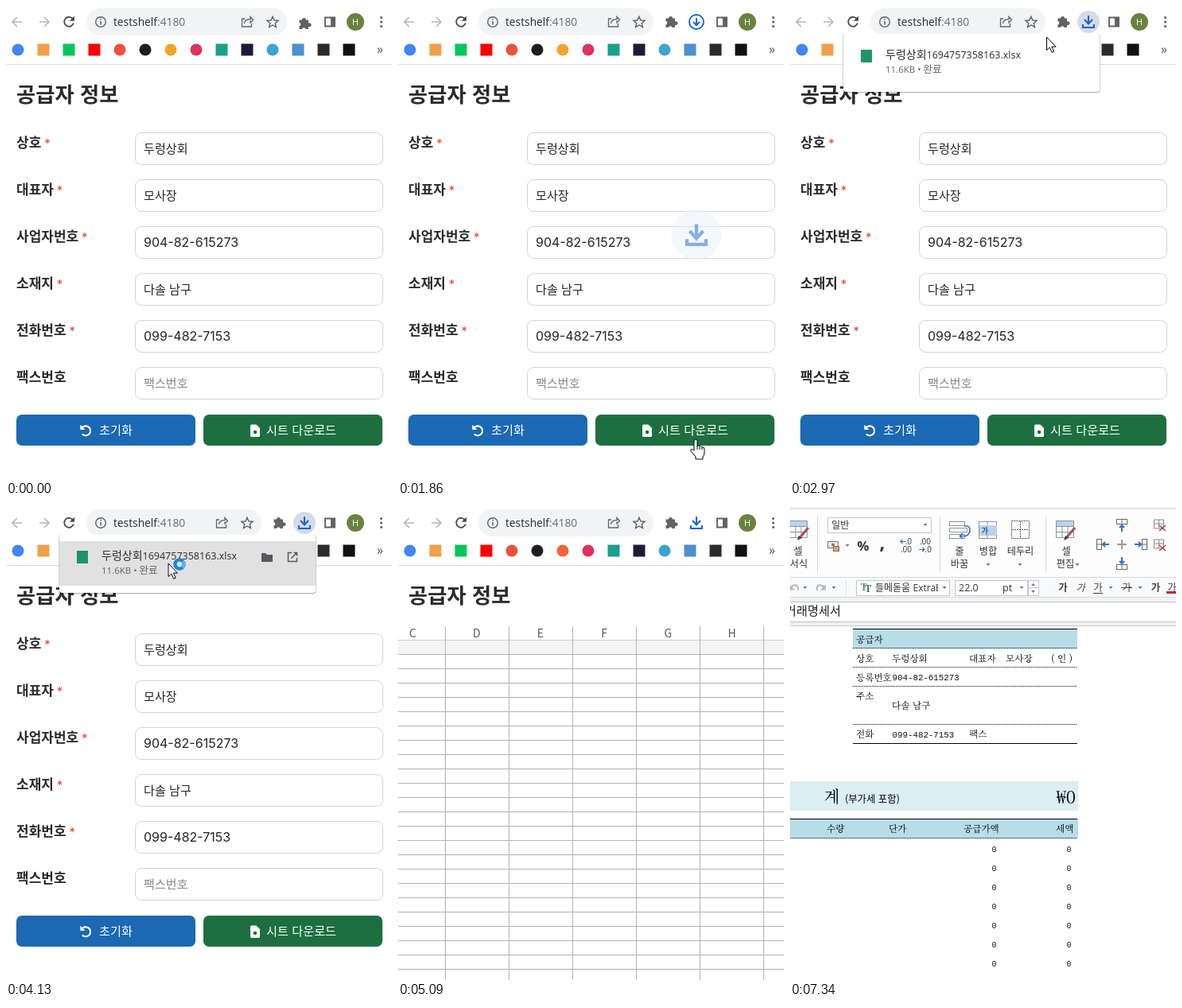
These frames come from a looping animation (485x595 px, 8370 ms). An HTML page:

```html
<!DOCTYPE html>
<html lang="ko">
<head>
<meta charset="utf-8">
<style>
html, body { margin: 0; width: 100%; height: 100%; overflow: hidden; background: #fff; }
svg { display: block; }
text { white-space: pre; }
.ko { font-family: "Noto Sans CJK KR", "Noto Sans CJK", sans-serif; }
.form { font-family: Inter, "Noto Sans CJK KR", sans-serif; }
.ui { font-family: "Open Sans", "Noto Sans CJK KR", sans-serif; }
.cell { font-family: "Noto Serif CJK KR", "Noto Sans CJK KR", serif; }
.num { font-family: "Liberation Mono", monospace; }
</style>
</head>
<body>
<svg id="stage" width="485" height="595" viewBox="0 0 485 595"></svg>
<script>
const LOOP = 8370;
const shop = '두렁상회', owner = '모사장', regNo = '904-82-615273', place = '다솔 남구', phone = '099-482-7153';

// Markup helpers
const text = (x, y, s, size, cls = 'ko', fill = '#222', extra = '') =>
  `<text x="${x}" y="${y}" font-size="${size}" class="${cls}" fill="${fill}" ${extra}>${s}</text>`;
const mid = 'text-anchor="middle"', end = 'text-anchor="end"';
const rect = (x, y, w, h, fill, extra = '') =>
  `<rect x="${x}" y="${y}" width="${w}" height="${h}" fill="${fill}" ${extra}/>`;
const path = (d, color, w = 1, extra = '') =>
  `<path d="${d}" fill="none" stroke="${color}" stroke-width="${w}" ${extra}/>`;
const solid = (d, fill, extra = '') => `<path d="${d}" fill="${fill}" ${extra}/>`;
const circle = (x, y, r, fill, extra = '') => `<circle cx="${x}" cy="${y}" r="${r}" fill="${fill}" ${extra}/>`;
const group = (id, body, extra = '') => `<g id="${id}" ${extra}>${body}</g>`;
const at = (x, y, body, scale = 1) => `<g transform="translate(${x} ${y}) scale(${scale})">${body}</g>`;
const range = (n, f) => Array.from({ length: n }, (_, i) => f(i)).join('');

const trayIcon = (color, w) => path('M0-8V2M-5-3L0 2.5 5-3M-7 3V7H7V3', color, w);
const ringCursor = circle(0, 0, 5.5, '#d9eefb', 'stroke="#1d86d8" stroke-width="4.5"') +
  path('M0-5.5A5.5 5.5 0 0 1 5.5 0', '#5db4f0', 4.5);

function browserBar() {
  const gray = '#5f6368';
  const arrow = 'M13 0H1M7-6L1 0 7 6';
  const marks = [
    [15, 'c', '#4285f4'], [47, 's', '#f0a04a'], [79, 's', '#03c75a'], [111, 's', '#ff0000'],
    [143, 'c', '#f0503c'], [175, 'c', '#1b1f23'], [207, 'c', '#f0a52a', 'id="tint"'], [239, 'c', '#e0315f'],
    [271, 's', '#1ba08c'], [303, 's', '#1c1c3a'], [335, 'c', '#3aa5d0'], [367, 's', '#4b90cf'],
    [399, 's', '#2b2b2b'], [431, 's', '#111111']
  ].map(([x, kind, color, extra]) => kind === 'c'
    ? circle(x, 55, 7.5, color, extra)
    : rect(x - 7.5, 47.5, 15, 15, color)).join('');
  return rect(0, 0, 485, 74, '#fff') +
    at(7, 20, path(arrow, '#b5b8bc', 1.7)) +
    at(55, 20, `<g transform="scale(-1 1)">${path(arrow, '#b5b8bc', 1.7)}</g>`) +
    path('M84.3 16.5A6 6 0 1 0 85 21.5', '#4a4d51', 1.8) + solid('M86 12.5V18.7H79.8Z', '#4a4d51') +
    rect(101, 3, 252, 34, '#f1f3f4', 'rx="17" id="pill"') +
    circle(119, 20, 6.3, 'none', `stroke="${gray}" stroke-width="1.4"`) +
    path('M119 19V23.5M119 16V17.6', gray, 1.5) +
    text(135, 25, 'testshelf<tspan fill="#6a6d71">:4180</tspan>', 13.8, 'ui', '#2a2b2e') +
    group('pillIcons',
      path('M300 16H296.5V26H308.5V22M299.5 22C300 18 303 16.5 307 16.5V13.5L310.5 17.5 307 21V18.5', gray, 1.3) +
      path('M335 13.3L337 18 342 18.4 338.2 21.7 339.4 26.6 335 24 330.6 26.6 331.8 21.7 328 18.4 333 18Z', gray, 1.4)) +
    group('puzzle', solid('M-6.5-4.5H-3A2.5 2.5 0 1 1 2-4.5H5V-.5A2.5 2.5 0 1 1 5 4V7H1.5A2.3 2.3 0 0 0-3 7H-6.5V3.5A2.3 2.3 0 0 0-6.5-1Z', gray)) +
    group('dl', circle(0, 0, 14, '#d5dbe6', 'id="dlHover"') +
      group('dlRing', circle(0, 0, 9, '#fff', 'stroke="#1a66c9" stroke-width="1.9"') +
        path('M0-5V4M-4 0L0 4.2 4 0', '#1a66c9', 2)) +
      group('dlTray', trayIcon('#1a66c9', 2.1)), 'transform="translate(375 20)"') +
    path('M401 14.5H413V25.5H401Z', gray, 1.9) + rect(408, 14, 5, 12, gray) +
    circle(439, 20, 11, '#68823f') + text(439, 24, 'H', 11, 'ui', '#fff', mid) +
    range(3, i => circle(471.5, 14.5 + i * 5.5, 1.6, gray)) +
    marks + text(466, 60, '»', 16, 'ui', '#4a4d51') +
    path('M0 73.5H485', '#dadce0');
}

function formPage() {
  const rows = [
    ['상호', 1, shop, 15.1, 'ko'], ['대표자', 1, owner, 15.1, 'ko'], ['사업자번호', 1, regNo, 16, 'form'],
    ['소재지', 1, place, 15.1, 'ko'], ['전화번호', 1, phone, 16, 'form'], ['팩스번호', 0, '팩스번호', 15.1, 'ko']
  ];
  return text(13, 121, '공급자 정보', 26.3, 'ko', '#2b2b2b', 'font-weight="700"') +
    rows.map(([label, need, value, size, cls], i) => {
      const y = 159 + i * 59;
      return text(13, y + 19, label, 17, 'ko', '#2b2b2b', 'font-weight="600"') +
        (need ? text(17 + label.length * 15.6, y + 18.5, '*', 15, 'form', '#f03e2e') : '') +
        rect(162.5, y + .5, 311, 40, '#fff', 'rx="8" stroke="#ced4da"') +
        text(173, y + 26, value, size, cls, need ? '#212529' : '#85898d');
    }).join('') +
    rect(13, 514, 225, 39, '#1b68b3', 'rx="7"') + rect(248, 514, 225, 39, '#1d6f42', 'rx="7"') +
    path('M95.5 530.5A6 6 0 1 1 95.8 538.5', '#fff', 2.1) + solid('M93.3 526.8V533H99.5Z', '#fff') +
    text(117, 539, '초기화', 15.2, 'ko', '#fff', 'font-weight="500"') +
    solid('M307 528Q307 526.5 308.5 526.5H314.5L319 531V540.5Q319 542 317.5 542H308.5Q307 542 307 540.5Z', '#fff') +
    circle(313, 536, 2.3, '#1d6f42') +
    text(327, 539, '시트 다운로드', 15.2, 'ko', '#fff', 'font-weight="500"');
}

function downloadPopup() {
  const gray = '#55585c';
  return rect(67, 36, 322, 74, '#000', 'rx="4" opacity=".1"') + rect(66, 35, 324, 74, '#000', 'rx="4" opacity=".18"') +
    rect(67, 35, 322, 73, '#fff', 'rx="4"') +
    group('rowHover', rect(67, 43, 322, 56, '#e1e1e1') +
      solid('M321 58H326L328 60H335V69H321Z', gray) +
      path('M359 57.5H354.5V68.5H365.5V64M361.5 57.5H365.5V61.5M365.5 57.5L358.5 64.5', gray, 1.5)) +
    rect(89, 55, 14, 16, '#1f9467') +
    text(120, 66, `${shop}<tspan class="ui" font-size="12.5">1694757358163.xlsx</tspan>`, 14, 'ko', '#2a2b2e') +
    text(120, 84, '11.6KB • <tspan font-size="12.5" class="ko">완료</tspan>', 11.5, 'ui', '#5f6368');
}

function emptyGrid() {
  return rect(0, 150, 485, 445, '#fff') + rect(0, 168, 485, 17, '#f4f4f4') +
    range(24, i => path(`M0 ${167.5 + i * 18}H485`, i ? '#b3b3b3' : '#cfcfcf')) +
    range(6, i => path(`M${59.5 + i * 80} 150V595`, '#b3b3b3')) +
    range(6, i => text(18.5 + i * 80.2, 164, 'CDEFGH'[i], 14, 'ko', '#555', mid + ' font-weight="300"'));
}

function ribbon() {
  const ink = '#333', edge = '#c3c7cc';
  const label = (x, y, s) => text(x, y, s, 12.2, 'ko', ink, mid);
  const caret = (x, y) => solid(`M${x - 2.5} ${y - 1}H${x + 2.5}L${x} ${y + 2}Z`, '#777');
  const box = (x, y, w, h) => rect(x + .5, y + .5, w, h, '#fff', `stroke="${edge}"`);
  const sep = x => path(`M${x + .5} 12V82`, '#d5d8dc');
  const table = path('M.5.5H22.5V21.5H.5ZM.5 7.5H22.5M.5 14.5H22.5M8 .5V21.5M15 .5V21.5', '#8a929c') + rect(1, 1, 21, 6, '#b9d3ee');
  const brush = path('M24 9L13 22', '#a85252', 3) + solid('M10 25L12 19 16 22Z', '#444');
  const insert = (x, y, angle) => `<g transform="translate(${x} ${y}) rotate(${angle})">` +
    rect(-6.5, -7.5, 13, 6, '#fff', 'stroke="#666"') + path('M0-7.5V-1.5', '#666') +
    path('M0 8V0M-3 3L0 0 3 3', '#2b74bd', 2) + '</g>';
  const remove = y => path(`M457.5 ${y - 7}H469.5V${y + 4}H457.5ZM457.5 ${y - 2}H469.5M463.5 ${y - 7}V${y + 4}`, '#888') +
    path(`M464 ${y}L472 ${y + 7}M472 ${y}L464 ${y + 7}`, '#b8433d', 1.5);
  const undo = path('M-2 101C3 96 8 98 7 105', '#555', 2) + solid('M-4 97.5V104.5H3Z', '#555');
  const ga = (x, extra) => text(x, 106, '가', 12.5, 'ko', '#444', `${mid} ${extra}`);
  return rect(0, 0, 485, 150, '#fdfdfd') + rect(0, 0, 485, 2, '#f1f2f4') + rect(0, 89, 485, 25, '#f8f9fa') +
    path('M0 2.5H485M0 88.5H485M0 113.5H485', '#d5d8dc') + rect(0, 114, 485, 6, '#f2f3f5') +
    rect(0, 120, 485, 24, '#fff') + path('M0 119.5H485M0 144.5H485', '#bfc3c8') +
    rect(0, 145, 485, 5, '#eff0f2') + path('M0 149.5H485', '#c6c9cd') +
    at(-1, 17, table + brush) + label(10, 60, '셀') + label(11, 76, '서식') + sep(34) +
    box(47, 13, 130, 19) + text(52, 27, '일반', 12.2, 'ko', ink) + caret(170, 22) +
    rect(47.5, 43.5, 13, 8, '#f0ead8', 'stroke="#777"') + circle(54, 47.5, 2, '#777') +
    rect(54.5, 49.5, 7, 6, '#d9a27c', 'stroke="#8a6a55"') + caret(72, 48) +
    text(92, 55, '%', 16.5, 'ui', ink, mid + ' font-weight="700"') + text(116, 53, ',', 24, 'ui', ink, mid + ' font-weight="700"') +
    text(153, 47, '.0', 10, 'ui', ink, end) + text(146, 57, '.00', 10, 'ui', ink, mid) + path('M146 43.5H139M141.5 41L139 43.5 141.5 46', '#2b74bd', 1.2) +
    text(170, 47, '.00', 10, 'ui', ink, mid) + text(178, 57, '.0', 10, 'ui', ink, end) + path('M162 53.5H169M166.5 51L169 53.5 166.5 56', '#2b74bd', 1.2) + sep(188) +
    range(3, i => rect(200.5, 18.5 + i * 8, i === 1 ? 22 : 19, 5, '#fff', 'stroke="#8a929c"')) +
    path('M219 24H222Q226 24 226 29T221 36.5H214M217 33L213.5 36.5 217 40', '#2b74bd', 1.6) +
    label(213, 60, '줄') + label(213, 76, '바꿈') +
    rect(237.5, 18.5, 22, 21, '#fff', 'stroke="#8a929c"') + path('M237.5 35H260M248 35V39.5M248 18.5V23', '#8a929c') +
    rect(238, 23, 22, 12, '#b9d3ee') + text(245, 33, '가', 9, 'ko', '#235a96', mid + ' font-weight="700"') + label(249, 60, '병합') + caret(249, 72) +
    path('M278.5 17.5H300.5V39.5H278.5ZM289.5 18V39M279 28.5H300', '#555', 1, 'stroke-dasharray="2 1"') +
    label(289.5, 60, '테두리') + caret(289, 72) + sep(321) +
    at(334, 17, table + brush) + label(347, 60, '셀') + label(346, 76, '편집') + caret(361, 72) +
    insert(417, 23, 0) + insert(393, 47, -90) + insert(441, 47, 90) + insert(417, 71, 180) +
    path('M417 41V53M411 47H423', '#999', 2) + remove(23) + remove(48) +
    group('undo', at(3, 0, undo) + at(41, 0, `<g transform="scale(-1 1)">${undo}</g>`)) +
    caret(19, 101) + caret(55, 101) + path('M70.5 93V111', '#dfe2e6') +
    box(83, 92, 117, 19) + caret(194, 101) + box(207, 92, 91, 19) + caret(291, 101) +
    text(212, 106, '', 12.5, 'ui', ink, 'id="size"') + text(267, 106, 'pt', 12.5, 'ui', ink) +
    box(299, 92, 13, 19) + path('M300 101.5H312', edge) + solid('M303 99L305.5 96 308 99ZM303 105H308L305.5 108Z', '#777') +
    ga(343, 'font-weight="700"') + ga(365, 'font-style="italic"') + ga(387, '') + path('M381 108.5H393', '#444') + caret(403, 101) +
    ga(423, '') + path('M416 101.5H430', '#444') + caret(440, 101) + ga(459.6, 'font-weight="900"') + ga(480, '') + rect(473, 106, 12, 3, '#c22a2a') +
    group('loaded', text(89, 105, 'T', 11, 'cell', '#2f8a5b', 'font-weight="700"') + text(94, 107, 'T', 12, 'cell', '#1f6e46', 'font-weight="700"') +
      `<svg x="107" y="93" width="79" height="18">${text(0, 13, '들메돋움 <tspan class="ui">ExtraBold</tspan>', 12, 'ko', ink)}</svg>` +
      text(-6, 136, '거래명세서', 15.2, 'ko', '#222'));
}

function invoice() {
  const ko = (x, y, s, size = 11.6, extra = '') => text(x, y, s, size, 'cell', '#000', extra);
  const num = (x, y, s, size = 10.8, extra = '') => text(x, y, s, size, 'num', '#111', extra);
  const dots = (x, y) => path(`M${x} ${y + .5}H361`, '#000', 1, 'stroke-dasharray="1 1"');
  const line = (x, y) => path(`M${x} ${y + .5}H361`, '#000');
  return rect(0, 150, 485, 445, '#fff') +
    rect(79, 153, 282, 25, '#b7dde8') + line(79, 153) + [177, 201, 225, 273].map(y => dots(79, y)).join('') + line(79, 297) +
    ko(83, 171, '공급자') + ko(83, 195, '상호') + ko(128, 195, shop) + ko(225, 195, '대표자') + ko(271, 195, owner) + ko(328, 195, '( 인 )') +
    ko(83, 219, '등록번호') + num(128.5, 218, regNo) + ko(83, 242, '주소') + ko(128, 254, place) +
    ko(83, 290, '전화') + num(128.5, 290, phone) + ko(225, 290, '팩스') +
    rect(0, 345, 362, 37, '#daeef3') + ko(43, 372, '계', 20) + text(69, 372, '(부가세 포함)', 12.4, 'ko', '#000') + ko(359, 373, '₩0', 22, end) +
    rect(0, 392, 362, 25, '#b7dde8') + line(0, 392) + dots(-1, 416) +
    ko(46, 409, '수량') + ko(124, 409, '단가') + ko(218, 409, '공급가액') + ko(334, 409, '세액') +
    range(7, i => [259.5, 353.5].map(x => num(x, 433.5 + i * 24, '0', 10, end)).join(''));
}

const stage = document.getElementById('stage');
stage.innerHTML = rect(0, 0, 485, 595, '#fff') + formPage() + browserBar() +
  group('flyer', circle(0, 0, 31.5, '#e8f0fd') + at(0, .5, trayIcon('#0f5dca', 2.5), 1.7)) +
  group('popup', downloadPopup()) + group('grid', emptyGrid()) +
  group('ribbon', ribbon()) + group('invoice', invoice()) +
  group('cursor',
    group('arrow', solid('M0 0V16.5L3.8 13 6.7 19.3 9.2 18.2 6.4 12.1H11.5Z', '#fff', 'stroke="#000"')) +
    group('hand', solid('M-2 14V2Q-2 0 0 0T2 2V8.5Q4 7.5 5 9 7 8.3 8 10 11 9.5 11 12.5V17Q11 20 9 22V25H0V22L-6 15Q-7 12.5-4.5 12.5Z', '#fff', 'stroke="#000"') +
      path('M2 8V13M5 9.5V13M8 10.5V13.5', '#000')) +
    group('busy', ringCursor)) +
  group('wait', at(0, 0, ringCursor, 1.25));

const el = {};
stage.querySelectorAll('[id]').forEach(n => { el[n.id] = n; });

const show = (id, on) => el[id].setAttribute('visibility', on ? 'inherit' : 'hidden');
const move = (id, x, y, turn = 0) => el[id].setAttribute('transform', `translate(${x} ${y}) rotate(${turn})`);
const clamp = v => Math.max(0, Math.min(1, v));

// time, x, y of the pointer tip
const trail = [
  [230, 418, 580], [300, 398, 563], [370, 379, 551], [440, 374, 547], [680, 374, 547], [690, 374, 545],
  [1930, 374, 545], [2200, 405, 420], [2550, 421, 150], [2760, 420, 32], [2830, 409, 27],
  [2970, 323, 39], [3150, 242, 58], [3330, 204, 70], [3530, 204, 70], [3600, 204, 71]
];
function pointer(t) {
  const i = trail.findIndex(k => k[0] > t);
  if (i < 0) return trail[trail.length - 1].slice(1);
  if (i === 0) return trail[0].slice(1);
  const [t0, x0, y0] = trail[i - 1], [t1, x1, y1] = trail[i];
  const p = (t - t0) / (t1 - t0);
  return [x0 + (x1 - x0) * p, y0 + (y1 - y0) * p];
}

function draw(t) {
  // Toolbar makes room for the download button
  const k = clamp((t - 1030) / 140);
  el.pill.setAttribute('width', 252 - 32 * k);
  move('pillIcons', -32 * k, 0);
  move('puzzle', 375 - 32 * k, 22 - 2 * k);
  const open = t >= 2270 && t < 4620;
  el.dl.setAttribute('opacity', k);
  show('dlHover', open);
  show('dlRing', t < 2270);
  show('dlTray', t >= 2270);
  el.tint.setAttribute('fill', t < 2270 ? '#f0a52a' : '#f4633a');

  // Download badge flies up the page, strongest halfway
  const p = (t - 1640) / 440;
  show('flyer', p > 0 && p < 1);
  move('flyer', 375, 603 - 628 * p);
  el.flyer.setAttribute('opacity', clamp(.5 - 2 * (p - .5) ** 2));

  show('popup', open);
  show('rowHover', open && t >= 3040);

  const [x, y] = pointer(t);
  const overButton = y > 514 && y < 553 && x > 248 && x < 473;
  show('cursor', t >= 230 && t < 4620);
  move('cursor', x, y);
  show('hand', overButton);
  show('arrow', !overButton);
  show('busy', t >= 3740);
  move('busy', 14, 1, t * .36);

  show('grid', t >= 4900);
  show('ribbon', t >= 5350);
  show('invoice', t >= 6160);
  const ready = t >= 6920;
  show('loaded', ready);
  el.undo.setAttribute('opacity', ready ? .4 : 1);
  el.size.textContent = ready ? '22.0' : '0.0';
  show('wait', t >= 6160 && t < 6720);
  move('wait', 202, 0, t * .36);
}

const start = performance.now();
function tick() {
  draw((performance.now() - start) % LOOP);
  requestAnimationFrame(tick);
}
tick();
</script>
</body>
</html>
```
